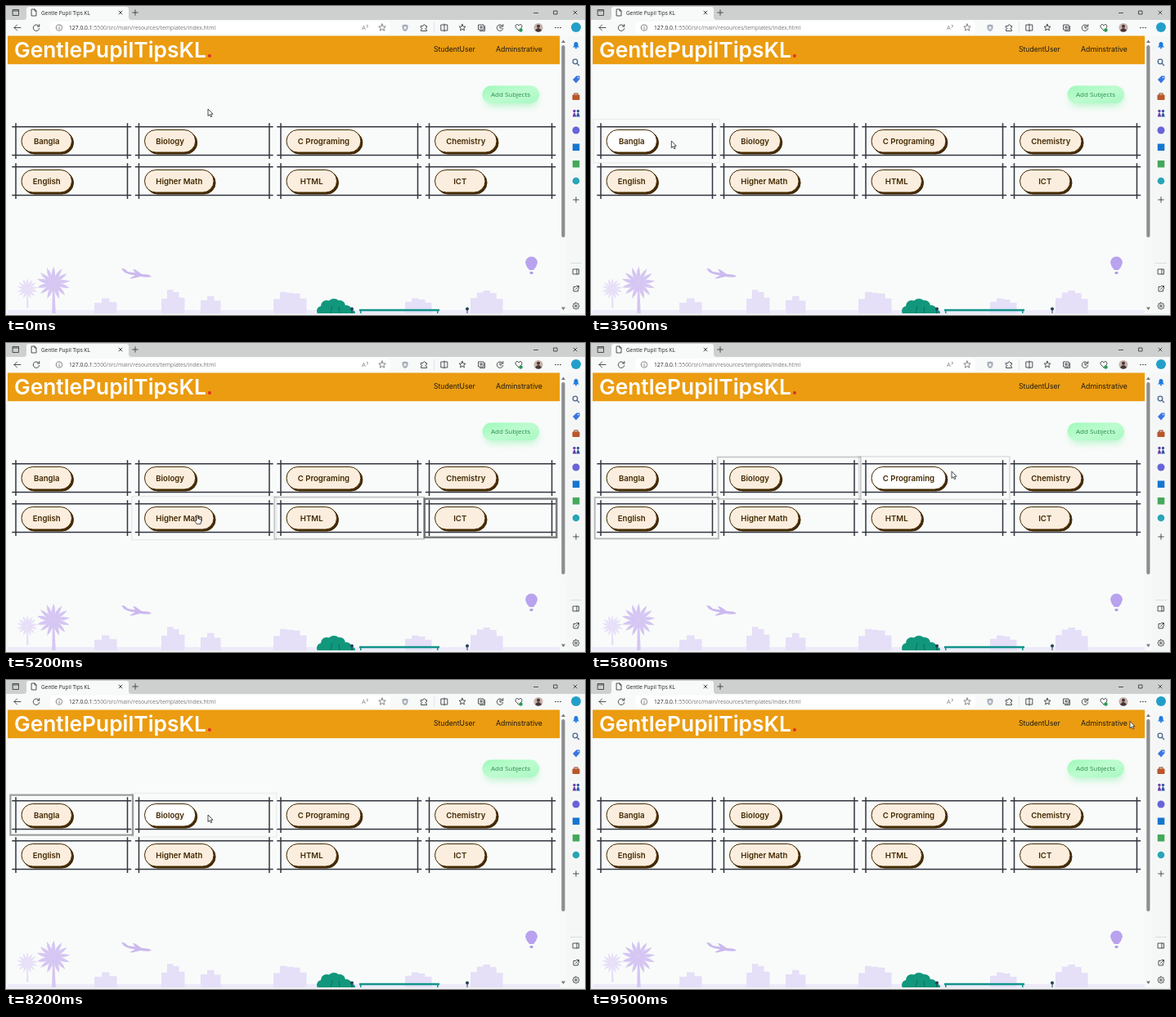
Recreate the animation shown at these times as an HTML page. Size 708 px wide and 378 px high, loop 9700 ms.

```html
<!DOCTYPE html>
<html lang="en">
<head>
<meta charset="utf-8">
<title>Gentle Pupil Tips KL</title>
<style>
html,body{margin:0;width:100%;height:100%;overflow:hidden;background:#f8f9f9}
svg{display:block;width:708px;height:378px}
text{font-family:Inter,sans-serif}
.ui{font-family:"Open Sans",sans-serif}
.ic{fill:none;stroke:#3c4043;stroke-width:.9;stroke-linecap:round;stroke-linejoin:round}
</style>
</head>
<body>
<svg viewBox="0 0 708 378">
<defs>
<linearGradient id="mint" x1="0" y1="0" x2="1" y2="1"><stop offset="0" stop-color="#9ff9ba"/><stop offset=".5" stop-color="#bdfccf"/><stop offset="1" stop-color="#a9f8c2"/></linearGradient>
<filter id="soft" x="-30%" y="-60%" width="160%" height="250%"><feGaussianBlur stdDeviation="4"/></filter>
<clipPath id="page"><rect x="2" y="36" width="675.5" height="340"/></clipPath>
</defs>
<g id="scene"></g>
<g id="rings" fill="none" stroke="#44474c"></g>
<g id="cards"></g>
<g id="cursor" fill="#fff" stroke="#222" stroke-width=".8" stroke-linejoin="round"></g>
</svg>
<script>
const $ = id => document.getElementById(id);
const range = n => [...Array(n).keys()];
const rect = (x, y, w, h, fill, more = '') => `<rect x="${x}" y="${y}" width="${w}" height="${h}" fill="${fill}" ${more}/>`;
const circle = (x, y, r, fill, more = '') => `<circle cx="${x}" cy="${y}" r="${r}" fill="${fill}" ${more}/>`;
const path = (d, fill, more = '') => `<path d="${d}" fill="${fill}" ${more}/>`;
const text = (x, y, size, fill, s, more = '') => `<text x="${x}" y="${y}" font-size="${size}" fill="${fill}" ${more}>${s}</text>`;
const icon = (x, y, d) => `<path class="ic" transform="translate(${x} ${y})" d="${d}"/>`;
const ring = r => `M${-r} 0A${r} ${r} 0 1 1 ${r} 0A${r} ${r} 0 1 1 ${-r} 0`;
const box = (w, h) => `M${-w} ${-h}H${w}V${h}H${-w}Z`;
const star = (r, n = 5, inner = .45) => 'M' + range(2 * n).map(i => {
  const a = i * Math.PI / n, k = i % 2 ? r * inner : r;
  return `${(k * Math.sin(a)).toFixed(2)} ${(-k * Math.cos(a)).toFixed(2)}`;
}).join('L') + 'Z';
const HEART = 'M0 4L-3.500 .5Q-5 -2 -2.800 -3.300Q-1 -4 0 -2Q1 -4 2.800 -3.300Q5 -2 3.500 .5Z';
const CROSS = 'M-2 -2L2 2M2 -2L-2 2', PLUS = 'M-3.300 0H3.300M0 -3.300V3.300';
const TURN = 'M3.500 -1.500A3.800 3.800 0 1 0 3.800 1M3.800 -4V-1.500H1.300';

function browser() {
  let s = rect(0, 0, 708, 378, '#f5f7f7') + rect(0, 0, 708, 17, '#cdd0ce')
    + path('M22 17Q25 17 25 13V4Q25 1 28 1H147Q150 1 150 4V13Q150 17 153 17Z', '#f8f9f9')
    + rect(0, 17, 708, 20, '#f8f9f9') + rect(54, 19, 416, 15, '#fff', 'rx="4"')
    + text(43, 10.500, 6.500, '#222', 'Gentle Pupil Tips KL', 'class="ui"')
    + text(77, 29, 6.780, '#777', '<tspan fill="#222">127.0.0.1</tspan>:5500/src/main/resources/templates/index.html', 'class="ui"');
  s += icon(12, 8, box(3.500, 3.500) + 'M-3.500 -2H3.500') + icon(34, 8, 'M-2.500 -4H1L3 -2V4H-2.500ZM1 -4V-2H3')
    + icon(140, 8, CROSS) + icon(158, 8, PLUS) + icon(648, 8, 'M-2.500 .5H2.500')
    + icon(672, 8, box(2, 2)) + icon(696, 8, CROSS)
    + icon(14, 26.500, 'M4 0H-4M-.5 -3.500L-4 0L-.5 3.500') + icon(37, 26.500, TURN)
    + `<g opacity=".7">${icon(65, 26.500, ring(3.700) + 'M0 -.3V2M0 -2V-1.900')}${text(435, 29, 7.500, '#555', 'A', 'class="ui"')}${icon(441.500, 24, 'M0 -1Q2 0 0 2')}${icon(460, 26.500, star(4.500))}</g>`
    + path('M484.500 23.500L488 22.500L491.500 23.500V27Q491 30 488 31Q485 30 484.500 27Z', '#a3abb6') + rect(486.500, 25, 3, 3.500, '#e8ecf1')
    + icon(511, 26.500, 'M-3.500 -2H-1Q.5 -6 2 -2H3.500V0Q0 1.200 3.500 2.500V4H-3.500V2Q-.5 1 -3.500 0Z')
    + rect(523, 20, .6, 13, '#d5d9db') + icon(536, 26.500, box(3.800, 3.500) + 'M0 -4.500V4.500')
    + icon(558, 26.500, star(4.200)) + icon(581, 26, box(3, 3) + 'M-1.500 4.500H4.500V-1.500M-1.500 0H1.500M0 -1.500V1.500')
    + icon(604, 26.500, TURN + 'M0 -2V.5H2') + icon(627, 26, HEART) + circle(629.500, 29.500, 2.200, '#2c9a54')
    + circle(651, 26.500, 5.500, '#c9b3aa') + circle(651, 24.700, 2, '#43353a')
    + path('M647 30Q651 24 655 30Q651 33.500 647 30Z', '#43353a');
  return s + range(3).map(i => circle(672 + 3 * i, 26.500, .8, '#333')).join('');
}

function sidebar() {
  const x = 697;
  const person = (px, c) => circle(px, 128.500, 1.700, c) + path(`M${px - 2.200} 135.500Q${px} 125.500 ${px + 2.200} 135.500Z`, c);
  let s = circle(x, 26, 6, '#229fc9')
    + path('M693 50.500Q695 49 694.500 47Q694.500 44 697 44Q699.500 44 699.500 47Q699 49 701 50.500Z', '#1d7be0') + circle(x, 51.300, 1.100, '#1d7be0')
    + circle(696, 68, 2.800, 'none', 'stroke="#4c6a8e" stroke-width="1.300"') + path('M698.300 70.300L701 73', 'none', 'stroke="#4c6a8e" stroke-width="1.300"')
    + path('M693 90L697.500 85.500H701.500V89.500L697 94.500Z', '#3b74e0') + circle(699.600, 87.600, .8, '#fff')
    + rect(695, 107, 4, 3, 'none', 'stroke="#8b3f1d"') + rect(692.500, 108.500, 9, 6.500, '#b8572a', 'rx="1"')
    + person(695, '#6b3fa8') + person(699.500, '#2f56a5')
    + circle(x, 152, 4.500, '#6664d8') + rect(692.800, 168.500, 8.500, 8.500, '#1676cf')
    + rect(692.800, 189, 8.500, 8.500, '#45a85b') + circle(x, 214, 4.300, '#28a5b8');
  s += icon(x, 237, PLUS) + rect(690, 314, 14, .7, '#cfd5d8') + icon(x, 325, box(3.500, 3) + 'M1 -3V3')
    + icon(x, 346, 'M-.5 -2.500H-3V3H2.500V.5M.5 -3.500H3.500V-.5M3.500 -3.500L-.5 .5')
    + icon(x, 367, ring(1.300) + star(4.200, 8, .75));
  return s + rect(677.500, 37, 8.500, 339, '#f7f9f9') + rect(679.300, 48, 4.200, 235, '#8b8d8f', 'rx="2"')
    + path('M679 45L681.500 41.500L684 45ZM679 368.500L681.500 372L684 368.500Z', '#777');
}

function palm(x, y, k, fill) {
  const leaves = range(13).map(i =>
    `<path d="M0 0Q10 -5 21 ${i % 2}Q11 4 0 0" transform="rotate(${112 + i * 26.500})"/>`).join('');
  return `<g fill="${fill}" transform="translate(${x} ${y}) scale(${k})"><path d="M-1.800 38L-1 0H1L2.800 38Z"/>${leaves}</g>`;
}

let seed = 11;
const rand = () => (seed = seed * 16807 % 2147483647) / 2147483647;

// A block of flats, tallest near the middle
function towers(x, width, top) {
  const n = Math.round(width / 8), w = width / n;
  return range(n).map(i => {
    const h = top * (.45 + .55 * Math.sin((i + .5) / n * Math.PI) * (.6 + .4 * rand()));
    return rect(x + i * w, 376 - h, w + .5, h, '#e5dff8');
  }).join('');
}

function pageBody() {
  let s = rect(2, 37, 675.500, 339, '#f9fbfa') + rect(2, 36.500, 675.500, 34.700, '#eb9c10')
    + text(10, 63, 26.300, '#fff', 'GentlePupilTipsKL<tspan fill="#e0352b">.</tspan>', 'font-weight="600"')
    + text(523, 55.700, 8.600, '#1d1a14', 'StudentUser') + text(599, 55.700, 8.750, '#1d1a14', 'Adminstrative')
    + rect(585, 103, 66, 20, '#8df0ac', 'rx="10" opacity=".55" filter="url(#soft)"')
    + rect(582.500, 97.500, 69.500, 21.500, 'url(#mint)', 'rx="10.750"')
    + text(617, 110.600, 8, '#2a8a4c', 'Add Subjects', 'class="ui" text-anchor="middle"')
    + rect(2, 372, 675, 4, '#edeafa')
    + towers(108, 27, 21) + towers(190, 28, 31) + towers(238, 24, 24) + towers(327, 40, 31) + towers(488, 32, 22) + towers(568, 39, 31)
    + palm(26, 346, .62, '#e7dff8') + palm(58, 339, .98, '#d5c6f3')
    + path('M141 321L145 321.500L149 325L158 326.500L155 322L158 322.500L166 328Q176 328 178 331Q174 332.500 164 331L154 333.500L151 333L158 329.500Q148 328 144 325Z', '#cbb9ef')
    + path('M635 314A7.500 7.500 0 1 1 650 314Q649 319 645 323H640Q636 319 635 314Z', '#b9a2ee')
    + rect(640.500, 325, 4, 3, '#b29be8', 'rx="1"');
  const bush = (x, y, r) => circle(x, y, r, '#11977c');
  s += bush(392, 367, 7) + bush(401, 366, 8) + bush(408, 367, 7) + bush(386, 373, 6) + bush(416, 373, 7) + bush(423, 376, 4)
    + rect(386, 370, 34, 6, '#11977c') + path('M397 376L399 367M408 376L407 368', 'none', 'stroke="#0c6f62"')
    + rect(432, 370.800, 98, 2.500, '#12948a') + rect(433, 373, 1.500, 3, '#12948a') + rect(527, 373, 1.500, 3, '#12948a');
  for (const x of [423, 564]) s += circle(x, 370.500, 2, '#25415a') + rect(x - .5, 371, 1, 5, '#25415a');
  return `<g clip-path="url(#page)">${s}</g>` + rect(0, 376, 708, 2, '#eef1f2');
}

const EDGES = [8, 158.500, 332, 513.500, 677.500];
const LABELS = ['Bangla', 'Biology', 'C Programing', 'Chemistry', 'English', 'Higher Math', 'HTML', 'ICT'];
const BTN_H = 27.500;
const cards = LABELS.map((label, i) => {
  const c = i % 4, row = i >> 2, l = EDGES[c], t = 143.300 + 49 * row;
  return { label, l, r: EDGES[c + 1] - 6, t, b: t + 43.700, bx: l + 11, by: t + 8.200 };
});

const drawCard = ({ l, r, t, b, bx, by, label }) =>
  path(`M${l - .7} ${t + 4.500}H${r + .7}M${l - .7} ${b - 4.500}H${r + .7}M${l + 4} ${t}V${b}M${r - 4} ${t}V${b}`, 'none', 'stroke="#30353f" stroke-width="1.500"')
  + `<g stroke="#422800">${rect(bx + 2, by + 2, 0, BTN_H, '#422800', 'rx="13.750" class="shade"')}${rect(bx, by, 0, BTN_H, '#fbeede', 'rx="13.750" class="btn"')}</g>`
  + text(0, by + 17, 9.600, '#422800', label, 'font-weight="600" text-anchor="middle" class="label"');

$('scene').innerHTML = browser() + pageBody() + sidebar();
$('cards').innerHTML = cards.map(drawCard).join('');
$('rings').innerHTML = cards.map(() => '<rect/>').join('');
$('cursor').innerHTML = '<path d="M0 0V8.500L2 6.700L3.400 9.700L4.800 9.100L3.500 6.200H6Z"/>'
  + '<path d="M-1 .5Q0 -.8 1 .5V4L4 4.700Q5.300 5 5 6.800L4.200 10.500H-.7L-3.200 7Q-3.300 5.600 -1 6.700Z"/>';
const ringEls = [...$('rings').children], [arrow, hand] = $('cursor').children;
const all = name => [...document.querySelectorAll('.' + name)];
const btnEls = all('btn'), shadeEls = all('shade');

// Buttons fit their label but keep a minimum width
all('label').forEach((el, i) => {
  const w = cards[i].bw = Math.max(61.500, el.getComputedTextLength() + 27.500);
  btnEls[i].setAttribute('width', w);
  shadeEls[i].setAttribute('width', w);
  el.setAttribute('x', cards[i].bx + w / 2);
});

// Pointer route: time, x, y
const ROUTE = [[0, 247, 126], [1400, 247, 126], [1900, 130, 140], [2100, 111.500, 134], [2600, 112, 139], [3300, 95, 163],
  [3600, 100, 166], [3900, 520, 162], [4200, 560, 165], [4290, 575, 187.500], [4430, 578, 192], [4500, 578, 204.500],
  [4700, 578, 205], [5300, 165, 212], [5500, 120, 212], [5600, 150, 196], [5630, 165, 185], [5715, 331, 163], [5800, 441, 157],
  [6050, 500, 138], [6500, 615, 109], [6800, 615, 109], [7285, 395, 143], [7300, 386, 185], [7400, 365, 212], [7620, 150, 212],
  [7800, 108, 165], [7930, 159, 163], [8200, 247, 165], [8500, 280, 135], [9300, 597, 61], [9500, 659, 50.500]];
function pointer(t) {
  const i = ROUTE.findIndex(k => k[0] > t);
  if (i < 0) return ROUTE[ROUTE.length - 1].slice(1);
  const [a, x, y] = ROUTE[i - 1], [b, u, v] = ROUTE[i], f = (t - a) / (b - a);
  return [x + (u - x) * f, y + (v - y) * f];
}
const within = (x, y, l, t, r, b) => x >= l && x <= r && y >= t && y <= b;
const overCard = (c, x, y) => within(x, y, c.l, c.t, c.r, c.b);
const overBtn = (c, x, y) => within(x, y, c.bx, c.by, c.bx + c.bw, c.by + BTN_H);

// Rings open quickly on hover and close evenly afterwards
const LOOP = 9700, STEP = 100, SUB = 5, OPEN = 35, CLOSE = 600;
const openness = [], state = cards.map(() => 0);
for (let t = 0; t < LOOP; t += SUB) {
  const [x, y] = pointer(t);
  cards.forEach((c, i) => {
    const p = state[i];
    state[i] = overCard(c, x, y) ? 1 - (1 - p) * Math.exp(-SUB / OPEN) : Math.max(0, p - SUB / CLOSE);
  });
  if (t % STEP === 0) openness.push([...state]);
}

function setAll(el, attrs) {
  for (const k in attrs) el.setAttribute(k, attrs[k]);
}

function draw(now) {
  const n = Math.floor((now % LOOP) / STEP), [x, y] = pointer(n * STEP);
  let link = within(x, y, 583, 98, 652, 119);
  cards.forEach((c, i) => {
    const p = openness[n][i], over = overCard(c, x, y), onBtn = overBtn(c, x, y);
    const o = .3 + 4.500 * p;
    link = link || onBtn;
    setAll(ringEls[i], {
      x: c.l - o, y: c.t - o, width: c.r - c.l + 2 * o, height: c.b - c.t + 2 * o,
      'stroke-width': 3 - 1.600 * p, opacity: p > (over ? .02 : .25) ? 1 - .93 * p : 0
    });
    btnEls[i].setAttribute('fill', over && !onBtn ? '#fff' : '#fbeede');
  });
  $('cursor').setAttribute('transform', `translate(${x} ${y})`);
  arrow.setAttribute('visibility', link ? 'hidden' : 'visible');
  hand.setAttribute('visibility', link ? 'visible' : 'hidden');
}
const start = performance.now();
function tick() {
  draw(performance.now() - start);
  requestAnimationFrame(tick);
}
tick();
</script>
</body>
</html>
```
